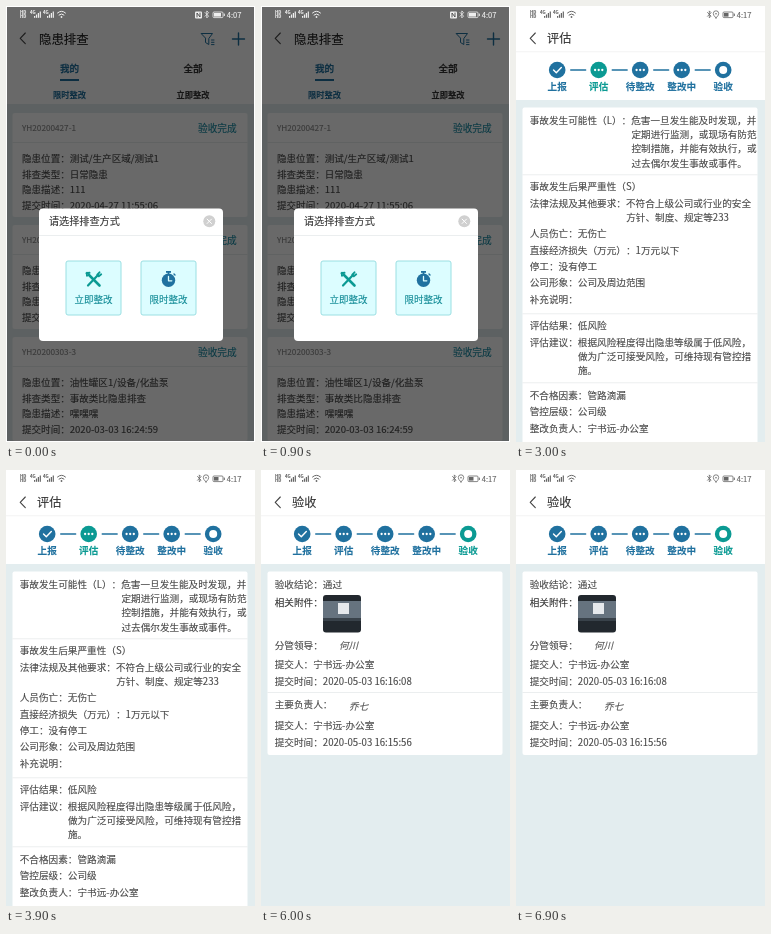
Recreate the animation shown at these times as an HTML page. Size 249 by 436 pixels, loop 7.5 s.

```html
<!DOCTYPE html>
<html lang="zh-CN">
<head>
<meta charset="utf-8">
<style>
html, body { margin: 0; height: 100%; overflow: hidden; background: #fff; }
svg { display: block; width: 100vw; height: 100vh; font-family: "Noto Sans CJK SC", "Noto Sans CJK", sans-serif; text-spacing-trim: space-all; }
</style>
</head>
<body>
<svg id="stage" viewBox="0 0 249 436"></svg>
<script>
const BLUE = '#20719f', TEAL = '#0b9a93', INK = '#484848', BACK = '#e3edef';
const SIZE = 9.65, LEFT = 13.7;
const PERSON = '宁书远-办公室';

const text = (x, y, s, size = SIZE, fill = INK, extra = '') =>
  `<text x="${x}" y="${y + size * .37}" font-size="${size}" fill="${fill}" stroke="${fill}" stroke-width=".12" ${extra}>${s}</text>`;
const mid = (x, y, s, size, fill, weight = 700) =>
  text(x, y, s, size, fill, `text-anchor="middle" font-weight="${weight}"`);
const rect = (x, y, w, h, fill, extra = '') =>
  `<rect x="${x}" y="${y}" width="${w}" height="${h}" fill="${fill}" ${extra}/>`;
const path = (d, color, w = 1, fill = 'none') =>
  `<path d="${d}" fill="${fill}" stroke="${color}" stroke-width="${w}" stroke-linecap="round" stroke-linejoin="round"/>`;
const dot = (x, y, r, fill) => `<circle cx="${x}" cy="${y}" r="${r}" fill="${fill}"/>`;
const rule = (y, x = 6.5, w = 235) => rect(x, y, w, .7, '#e3e7e8');
const card = (y, h) => rect(6.5, y, 235, h, '#fff', 'rx="2"');

const rows = (ys, list, x = LEFT, size = SIZE) =>
  list.map(([label, value = ''], i) => text(x, ys[i], `${label}：${value}`, size)).join('');
// Continuation lines start where the value starts, after the label and its colon
const lines = (chars, y, step, list) =>
  list.map((s, i) => text(LEFT + chars * SIZE, y + i * step, s)).join('');

function statusBar(color, time, nfc) {
  const tiny = (x, y, s) => text(x, y, s, 4.3, color, 'font-weight="700"');
  let s = tiny(14, 6, 'HD') + tiny(14, 10.6, 'HD');
  for (const x of [24, 37]) {
    s += tiny(x, 6, '4G');
    for (let i = 0; i < 4; i++) s += rect(x + 4 + i * 1.9, 10 - i * 1.5, 1.2, 1.8 + i * 1.5, color);
  }
  s += path('M51.5 7 Q55.5 3.4 59.5 7 M53 9 Q55.5 6.8 58 9', color, 1) + dot(55.5, 11, .9, color);
  const bt = x => path(`M${x} 6.5 l3.6 3.6 l-1.8 1.8 v-7 l1.8 1.8 l-3.6 3.6`, color, .8);
  s += nfc
    ? rect(189, 5.4, 7, 7, color, 'rx="1"') + path('M191 11 V7 L194 11 V7', '#444', .9) + bt(199)
    : bt(191.5) + path('M200 12 Q197 9 197.3 7.5 A2.7 2.7 0 0 1 202.7 7.5 Q203 9 200 12 Z', color, .8) + dot(200, 7.7, .8, color);
  s += rect(207, 6, 10, 5.6, 'none', `rx="1" stroke="${color}" stroke-width=".8"`) +
    rect(208, 7, nfc ? 7 : 4.5, 3.6, color) + rect(217.8, 7.6, 1, 2.4, color);
  return s + text(220.8, 8.7, time, 7.6, color);
}

const chevron = path('M19.3 27 L14.2 32.3 L19.3 37.6', '#444', 1.1);

const STEPS = ['上报', '评估', '待整改', '整改中', '验收'];
function page(active, body) {
  let s = rect(0, 0, 249, 436, BACK) + rect(0, 0, 249, 94, '#fff') +
    statusBar('#666', '4:17') + chevron + text(31, 32.5, STEPS[active], 12.2, '#333') +
    rect(0, 45.5, 249, .7, '#eee');
  STEPS.forEach((name, i) => {
    const x = 41.2 + i * 41.5, color = i === active ? TEAL : BLUE;
    if (i) s += path(`M${x - 28} 64 H${x - 13}`, BLUE, 1.3);
    s += dot(x, 64, 8.3, color);
    if (i === 0) s += path(`M${x - 3.7} 64 l2.8 2.8 l5 -5.2`, '#fff', 1.4);
    else if (i === 4) s += dot(x, 64, 4, '#fff');
    else for (const d of [-3.6, 0, 3.6]) s += dot(x + d, 64, 1.15, '#fff');
    s += mid(x, 80.3, name, 9.6, color);
  });
  return s + body;
}

function photo(y, tones, px, py, size) {
  return rect(62, y, 38, 37.5, tones[0], 'rx="3"') + rect(62, y + 6, 38, 17, tones[1]) +
    rect(62, y + 23, 38, 3, tones[2]) + rect(px, py, size, size, '#e6e9ec');
}

function listPage() {
  let s = rect(0, 0, 249, 436, BACK) + rect(0, 0, 249, 98, '#fff') + chevron +
    text(33, 33, '隐患排查', 12.4, '#222') +
    path('M195.5 27.5 H206.5 L202.8 32.5 V38.5 L199.5 36.5 V32.5 Z M205.5 34 h2.5 M205.5 36.3 h2.5 M205.5 38.6 h2.5', BLUE, 1) +
    path('M226.5 33 H238.5 M232.5 27 V39', BLUE, 1.4) +
    mid(63.5, 62, '我的', 9.6, BLUE) + mid(187, 62, '全部', 9.6, '#333') + rect(54, 73, 19, 2, BLUE) +
    mid(63.5, 89, '限时整改', 8.2, BLUE) + mid(187, 89, '立即整改', 8.2, '#333');
  const items = [
    ['YH20200427-1', '测试/生产区域/测试1', '日常隐患', '111', '2020-04-27 11:55:06'],
    ['YH20200303-4', '设备', '日常隐患', '无', '2020-03-03 16:30:12'],
    ['YH20200303-3', '油性罐区1/设备/化盐泵', '事故类比隐患排查', '嘿嘿嘿', '2020-03-03 16:24:59']
  ];
  const labels = ['隐患位置', '排查类型', '隐患描述', '提交时间'];
  items.forEach(([code, ...values], i) => {
    const y = 107 + i * 112;
    s += card(y, 104) + text(16, y + 15, code, 8.2, '#888') +
      text(192, y + 15, '验收完成', 9.7, '#168aa3', 'font-weight="500"') + rule(y + 29) +
      rows([45, 61, 76.5, 92].map(d => y + d), labels.map((l, k) => [l, values[k]]), 16, 9.55);
  });
  return s + rect(0, 0, 249, 436, '#000', 'opacity=".59"') + statusBar('#eee', '4:07', true) + dialog() +
    rect(0, 0, 249, 436, 'none', 'stroke="#fff" stroke-width="2"');
}

function dialog() {
  const button = (x, label) => rect(x, 255, 55, 54, '#dcfdff', 'rx="2" stroke="#9adfe2" stroke-width="1"') +
    mid(x + 27.5, 293.3, label, 9.5, '#128b96', 500);
  return rect(33, 202.5, 184, 132.5, '#fff', 'rx="4"') + text(43, 215.5, '请选择排查方式', 10.15, '#333') +
    dot(203.3, 215.3, 6, '#d0d0d0') + path('M201.1 213.1 l4.4 4.4 m0 -4.4 l-4.4 4.4', '#fff', 1) +
    rule(229, 33, 184) + button(60, '立即整改') + button(135, '限时整改') +
    path('M83 269 L93.5 279.5', TEAL, 2.6) + path('M80.5 267.3 l3 -.5 M81 266.8 v3', TEAL, 2) +
    path('M92 269 L82 279.5', TEAL, 2.2) + path('M93.5 266.3 l-2.2 2.3 l1.5 1.7 l2.4 -2', TEAL, 1.9) +
    dot(162.5, 274.3, 6.7, BLUE) + rect(160, 265, 5, 1.8, BLUE) + rect(161.7, 265.5, 1.6, 4, BLUE) +
    path('M162.5 270.5 V274.8 H165.8', '#dcfdff', 1.3) + path('M168 268 l1 1', BLUE, 1.4);
}

const attachment = y => text(LEFT, y, '相关附件：', SIZE, '#333', 'font-weight="500"');

const report = () => page(0, card(101.5, 260.5) +
  rows([114, 131], [['上报人', PERSON], ['上报时间', '2020-05-03 16:12:23']]) + rule(143) +
  rows([...Array(9).keys()].map(i => 154.5 + i * 16.9), [
    ['排查类型', '季节性隐患'], ['隐患来源', '企业检查'], ['隐患所属工厂', '沐岚化工'],
    ['隐患所属区域', '粉末车间'], ['隐患类型', '设备'], ['隐患位置', '化盐泵'],
    ['专业分类', '跑冒滴漏'], ['发生环节', '使用操作'], ['隐患描述', '有滴漏']]) +
  attachment(307.5) + photo(300.5, ['#20252d', '#3b4656', '#69727c'], 81, 305, 9) +
  rule(341) + rows([350], [['评估人', PERSON]]));

const review = () => page(1, card(101.5, 340) +
  rows([114], [['事故发生可能性（L）', '危害一旦发生能及时发现，并']]) +
  lines(10.54, 128.4, 14.4, ['定期进行监测，或现场有防范', '控制措施，并能有效执行，或', '过去偶尔发生事故或事件。']) +
  rule(168.5) + text(LEFT, 180.5, '事故发生后果严重性（S）') +
  rows([197, 227.8, 244.2, 260.5, 276.8, 293.2], [['法律法规及其他要求', '不符合上级公司或行业的安全'],
    ['人员伤亡', '无伤亡'], ['直接经济损失（万元）', '1万元以下'],
    ['停工', '没有停工'], ['公司形象', '公司及周边范围'], ['补充说明']]) +
  lines(10, 211.4, 0, ['方针、制度、规定等233']) + rule(307.5) +
  rows([319.5, 336], [['评估结果', '低风险'], ['评估建议', '根据风险程度得出隐患等级属于低风险，']]) +
  lines(5, 350.4, 14.4, ['做为广泛可接受风险，可维持现有管控措', '施。']) +
  rule(376.5) +
  rows([389, 405.5, 422], [['不合格因素', '管路滴漏'], ['管控层级', '公司级'], ['整改负责人', PERSON]]));

const pending = () => page(2, card(101.5, 141.5) +
  rows([115, 132, 156, 173, 190, 213.5, 230.5], [['整改负责人', PERSON], ['提交时间', '2020-05-03 16:17:08'],
    ['整改意见', '先停工，在整改'], ['整改对象', '液氯盐酸工段'], ['责任部门', '办公室'],
    ['整改作业人', PERSON], ['整改完成期限', '2020-05-20']]) + rule(143.5) + rule(201.5));

const sign = (x, y, s) => text(x, y, s, 9.5, '#555', 'font-style="italic" font-weight="300"');
const accept = () => page(4, card(101.5, 183.5) +
  rows([114.5, 175.5, 194.5, 211.5, 234.5, 255.5, 272.5], [['验收结论', '通过'], ['分管领导'],
    ['提交人', PERSON], ['提交时间', '2020-05-03 16:16:08'],
    ['主要负责人'], ['提交人', PERSON], ['提交时间', '2020-05-03 16:15:56']]) +
  attachment(132) + photo(125, ['#22282e', '#66737f', '#39424a'], 77, 133, 11) +
  sign(78, 175.5, '何川') + sign(88, 236.5, '乔七') + rule(222));

const HOLD = 1500;
const stage = document.getElementById('stage');
const pages = [listPage, report, review, pending, accept];
stage.innerHTML = pages.map(p => `<g>${p()}</g>`).join('');

const start = performance.now();
function tick() {
  const now = Math.floor((performance.now() - start) / HOLD) % pages.length;
  [...stage.children].forEach((g, i) => g.style.display = i === now ? '' : 'none');
  requestAnimationFrame(tick);
}
tick();
</script>
</body>
</html>
```
